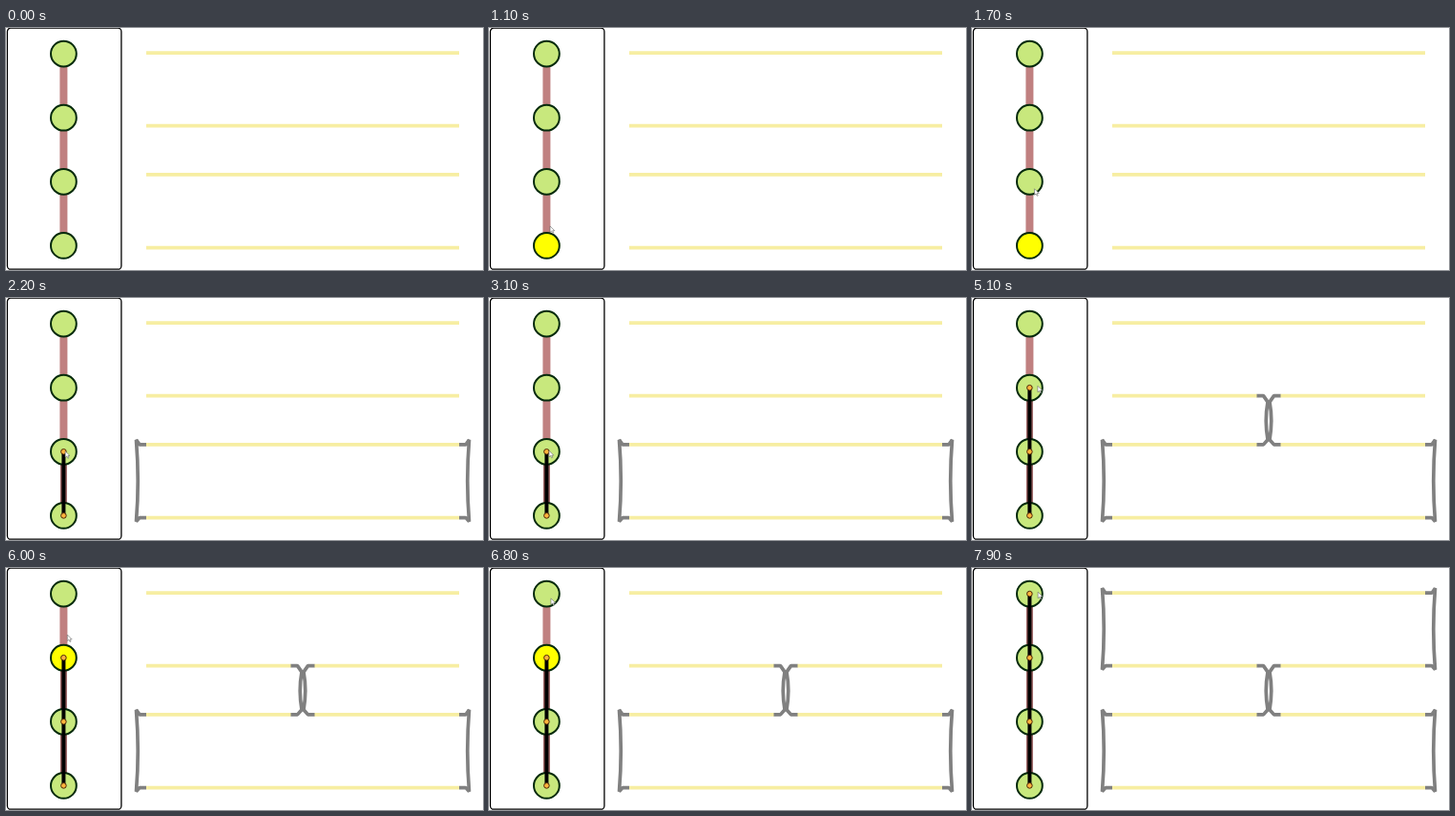
These frames come from a looping animation (500x254 px, 8000 ms). An HTML page with a canvas:

```html
<!DOCTYPE html>
<html lang="en">
<head>
<meta charset="utf-8">
<style>
html, body { margin: 0; width: 100%; height: 100%; overflow: hidden; background: #fff; }
canvas { display: block; }
</style>
</head>
<body>
<canvas id="stage" width="500" height="254"></canvas>
<script>
const ctx = document.getElementById('stage').getContext('2d');
const LOOP = 8000, STEP = 100;
const X = 60.4, LEFT = 147, RIGHT = 475, MID = 311;
const rows = [26.2, 102.6, 153.9, 230.6];
const picked = [900, 3300, 5700];   // a node is selected
const joined = [2100, 4200, 7200];  // its link to the next node is made
const nodeY = i => 228.4 - 67.1 * i;

function stroke(color, width) {
  ctx.strokeStyle = color;
  ctx.lineWidth = width;
  ctx.stroke();
}

function line(color, width, x1, y1, x2, y2) {
  ctx.beginPath();
  ctx.moveTo(x1, y1);
  ctx.lineTo(x2, y2);
  stroke(color, width);
}

function disc(y, r, fill, edge, width) {
  ctx.beginPath();
  ctx.arc(X, y, r, 0, 7);
  ctx.fillStyle = fill;
  ctx.fill();
  stroke(edge, width);
}

// Stubs on two rows joined by a bowed strand; dip moves its ends inwards
function bridge(x, dir, top, bottom, reach, dip) {
  const stub = x + dir * 7, end = x + dir * reach;
  ctx.beginPath();
  ctx.moveTo(x, top);
  ctx.lineTo(stub, top);
  ctx.lineTo(end, top + dip);
  ctx.quadraticCurveTo(end - dir * 3.5, (top + bottom) / 2, end, bottom - dip * 0.8);
  ctx.lineTo(stub, bottom);
  ctx.lineTo(x, bottom);
  stroke('#808080', 3.7);
}

function sides(top, bottom) {
  bridge(LEFT, -1, top, bottom, 10.5, -5);
  bridge(RIGHT, 1, top, bottom, 10.5, -5);
}

// The pointer glides from node to node and sways right while it waits
function pointerAt(t) {
  const i = picked.findLastIndex(at => t >= at);
  const moving = t < joined[i];
  const from = moving ? picked[i] : joined[i];
  const to = moving ? joined[i] : picked[i + 1] ?? LOOP + picked[0];
  const k = (t - from) / (to - from), bump = Math.sin(Math.PI * k);
  return moving
    ? [62 + 4 * bump, nodeY(i + 1 - (1 - k) ** 2)]
    : [62 + 8 * bump ** 3, nodeY(i + 1) - 2 * bump];
}

function pointer(t) {
  ctx.save();
  ctx.translate(...pointerAt(t));
  const arrow = new Path2D('M0 0V6.5L1.6 5.2 2.7 7.5 3.7 7 2.7 4.8H4.8Z');
  ctx.fillStyle = '#fff';
  ctx.fill(arrow);
  ctx.strokeStyle = '#666';
  ctx.lineWidth = 0.6;
  ctx.stroke(arrow);
  ctx.restore();
}

function drawPanel(t, links) {
  ctx.beginPath();
  ctx.roundRect(1.4, 0.2, 119.5, 253, 3.5);
  stroke('#000', 1.3);

  for (let i = 0; i < 3; i++) {
    const made = i < links;
    line(made ? '#985f5f' : '#c08080', made ? 7 : 8, X, nodeY(i), X, nodeY(i + 1));
  }
  for (let i = 0; i < 4; i++) {
    const active = i === links && t >= picked[i];
    disc(nodeY(i), 13.4, active ? '#ffff00' : '#c8e87d', '#042a0c', 2);
  }
  if (!links) return;
  line('#000', 4, X, nodeY(0), X, nodeY(links));
  for (let i = 0; i <= links; i++) disc(nodeY(i), 2.8, '#ffb43c', '#4a2508', 1);
}

function drawRows(links) {
  rows.forEach((y, i) => {
    const gap = links > 1 && (i === 1 || i === 2) ? 12 : 0;
    line('#f7eea2', 3.8, LEFT, y, MID - gap, y);
    line('#f7eea2', 3.8, MID + gap, y, RIGHT, y);
  });
  if (links > 0) sides(rows[2], rows[3]);
  if (links > 1) {
    for (const dir of [-1, 1]) bridge(MID - dir * 12.5, dir, rows[1], rows[2], 11.5, 6.5);
  }
  if (links > 2) sides(rows[0], rows[1]);
}

function draw(t) {
  const links = joined.filter(at => t >= at).length;
  ctx.clearRect(0, 0, 500, 254);
  ctx.lineJoin = 'bevel';
  drawPanel(t, links);
  drawRows(links);
  if (t >= picked[0]) pointer(t);
}

const start = performance.now();
function frame() {
  const t = (performance.now() - start) % LOOP;
  draw(Math.floor(t / STEP) * STEP);
  requestAnimationFrame(frame);
}
frame();
</script>
</body>
</html>
```
